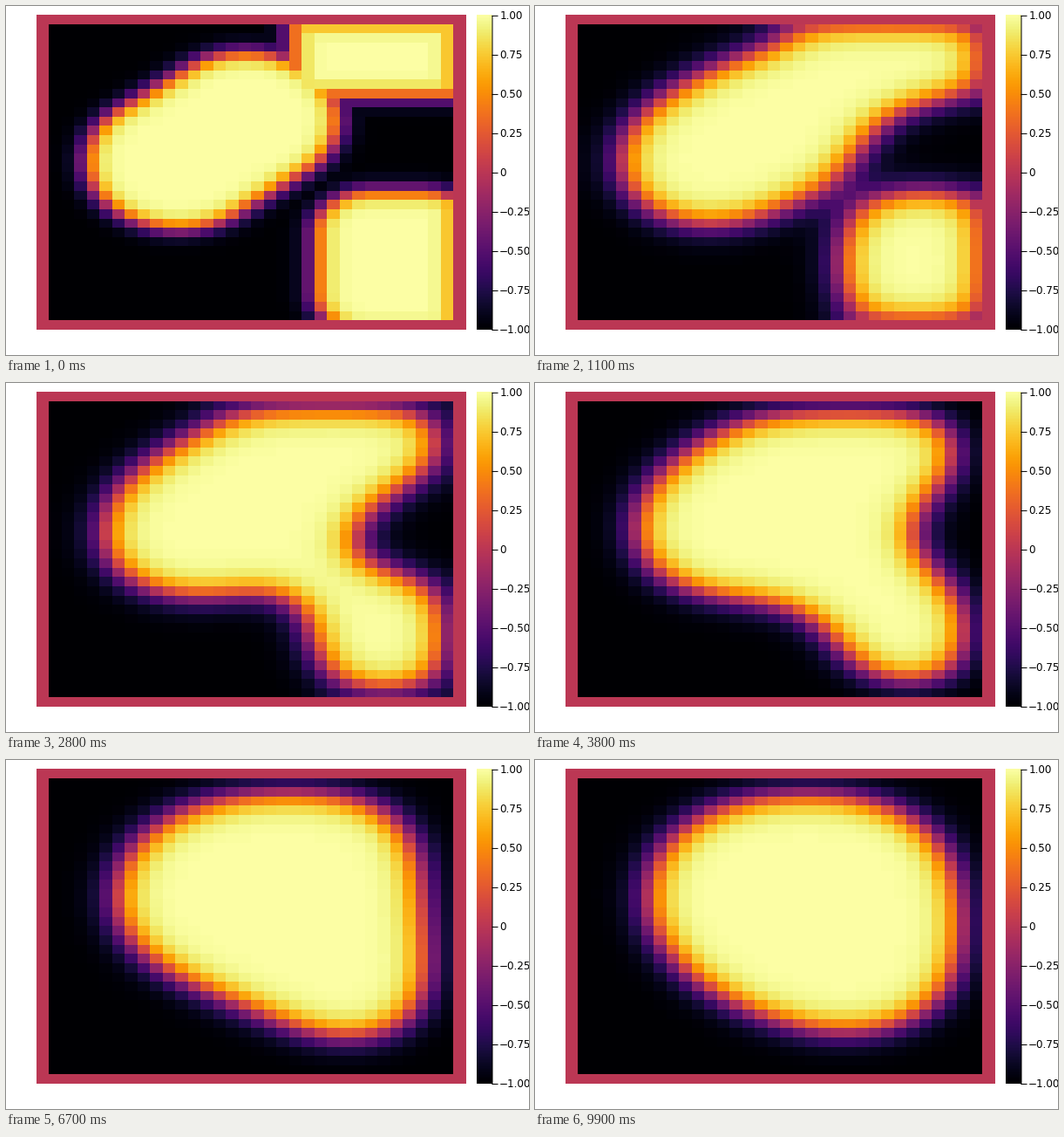
These frames come from a looping animation (600 px wide and 400 px high, 10000 ms). A matplotlib script:

```python
import numpy as np
import matplotlib.pyplot as plt
from matplotlib.animation import FuncAnimation

W, H, DPI = 600, 400, 100
FRAMES, STEP = 100, 100                  # count, ms
N = 34                                   # grid cells per side, walls included
LEFT, RIGHT, TOP, BOTTOM = 35.4, 528.4, 11.4, 371.5

EPS = 1.17                               # interface width in cells
MOBILITY = 7.0                           # cells^2 per second
SUBSTEPS = 10
DT = STEP / 1000 / SUBSTEPS
WALL_TIME = 3.5                          # seconds until the walls repel fully

axis = np.arange(1, N - 1) + 0.5
gx, gy = np.meshgrid(axis, axis)


def capsule(x0, y0, x1, y1, r):
    """Depth inside a thick rounded line, in cells."""
    dx, dy = x1 - x0, y1 - y0
    k = np.clip(((gx - x0) * dx + (gy - y0) * dy) / (dx**2 + dy**2), 0, 1)
    return r - np.hypot(gx - x0 - k * dx, gy - y0 - k * dy)


def round_box(x0, y0, x1, y1, r):
    """Depth inside a box with rounded corners, in cells."""
    qx = abs(gx - (x0 + x1) / 2) - (x1 - x0) / 2 + r
    qy = abs(gy - (y0 + y1) / 2) - (y1 - y0) / 2 + r
    outside = np.hypot(np.maximum(qx, 0), np.maximum(qy, 0))
    return r - outside - np.minimum(np.maximum(qx, qy), 0)


def start():
    body = capsule(11.3, 15.8, 16.6, 11.4, 7.35)
    arm = round_box(20.1, -2, 34.5, 8.9, 1.5)
    foot = round_box(22, 19, 35, 34.5, 4.5)
    depth = np.maximum.reduce([body, arm, foot])
    depth = np.minimum.reduce([depth, N - 0.5 - gx, gy - 0.5])
    return np.tanh(depth / 1.05)


def advance(u, t):
    """One step of the Allen-Cahn flow that keeps the total amount of u."""
    p = np.pad(u, 1, mode="edge")
    wall = -min(t / WALL_TIME, 1)
    for edge in (p[0], p[-1], p[:, 0], p[:, -1]):
        np.minimum(edge, wall, out=edge)
    lap = p[:-2, 1:-1] + p[2:, 1:-1] + p[1:-1, :-2] + p[1:-1, 2:] - 4 * u
    rate = lap + (u - u**3) / EPS**2
    well = 1 - u**2
    rate -= well * rate.sum() / well.sum()
    return u + MOBILITY * DT * rate


def simulate():
    u = start()
    for i in range(FRAMES):
        yield np.pad(u, 1)
        for j in range(SUBSTEPS):
            u = advance(u, (i * SUBSTEPS + j) * DT)


fields = list(simulate())

fig = plt.figure(figsize=(W / DPI, H / DPI), dpi=DPI, facecolor="white")
ax = fig.add_axes([0, 0, 1, 1])
ax.axis("off")

style = dict(cmap="inferno", vmin=-1, vmax=1, aspect="auto",
             interpolation="nearest")
heat = ax.imshow(fields[0], extent=(LEFT, RIGHT, BOTTOM, TOP), **style)
ax.imshow(np.linspace(1, -1, 256)[:, None],
          extent=(540, 558, BOTTOM, TOP), **style)

line = dict(color="black", lw=0.72, snap=False)
ax.plot([558, 558], [TOP, BOTTOM], **line)
for v in np.linspace(-1, 1, 9):
    y = TOP + (1 - v) / 2 * (BOTTOM - TOP)
    label = f"{v:.2f}".replace("-", "\u2212") if v else "0"
    ax.plot([558, 564], [y, y], **line)
    ax.text(566.2, y, label, family="DejaVu Sans", fontsize=8.64,
            ha="left", va="center")

ax.set_xlim(0, W)
ax.set_ylim(H, 0)


def draw(i):
    heat.set_data(fields[i])
    return [heat]


anim = FuncAnimation(fig, draw, frames=FRAMES, interval=STEP, repeat=True,
                     repeat_delay=0)
plt.show()
```
